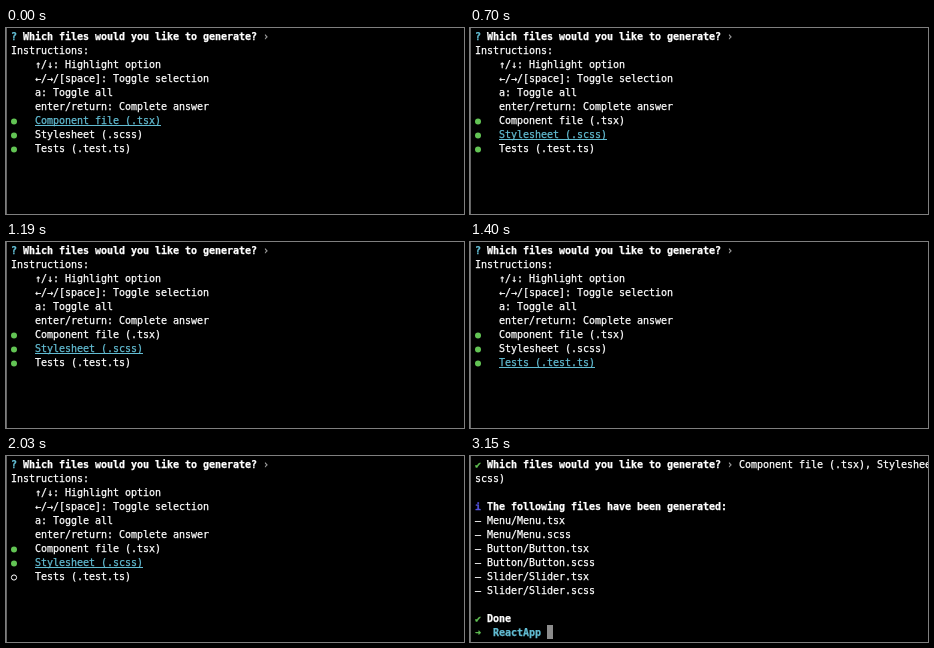
An HTML page that plays this animation: 458x186 px, repeating every 4200 ms.

```html
<!DOCTYPE html>
<html lang="en">
<head>
<meta charset="utf-8">
<title>File generator prompt</title>
<style>
html, body { margin: 0; width: 100%; height: 100%; overflow: hidden; background: #000; }
svg { display: block; width: 458px; height: 186px; }
text {
  font: 10px "DejaVu Sans Mono", "Noto Sans Mono", monospace;
  letter-spacing: -0.02px;
  white-space: pre;
  fill: currentColor;
  stroke: currentColor;
  stroke-width: 0.25px;
}
.bold { font-weight: bold; }
</style>
</head>
<body>
<svg id="stage" viewBox="0 0 458 186"></svg>
<script>
const LOOP = 4200;
const LEFT = 5, COL = 6, ROW = 14, BASE = 12;
const WHITE = '#fff', CYAN = '#62bcd2', GREEN = '#62c454', BLUE = '#5654e0', GREY = '#8c8c8c';
const stage = document.getElementById('stage');

function add(parent, tag, attrs, content) {
  const el = document.createElementNS('http://www.w3.org/2000/svg', tag);
  for (const key in attrs) el.setAttribute(key, attrs[key]);
  if (content) el.textContent = content;
  parent.appendChild(el);
  return el;
}

const colX = col => LEFT + col * COL;
const rowY = row => BASE + row * ROW;

function print(parent, row, col, content, color = WHITE, bold = false) {
  return add(parent, 'text', { x: colX(col), y: rowY(row), color, class: bold ? 'bold' : '' }, content);
}

add(stage, 'rect', { width: 458, height: 186, fill: '#000' });
add(stage, 'rect', { width: 1, height: 186, fill: '#666' });
print(stage, 0, 2, 'Which files would you like to generate?', WHITE, true);
print(stage, 0, 42, '›', '#a8a8a8');

// Selection menu
const menu = add(stage, 'g', {});
print(menu, 0, 0, '?', CYAN, true);
print(menu, 1, 0, 'Instructions:');
['↑/↓: Highlight option', '←/→/[space]: Toggle selection', 'a: Toggle all', 'enter/return: Complete answer']
  .forEach((line, i) => print(menu, 2 + i, 4, line));

const options = ['Component file (.tsx)', 'Stylesheet (.scss)', 'Tests (.test.ts)'].map((name, i) => {
  const row = 6 + i;
  return {
    dot: add(menu, 'circle', { cx: 8, cy: rowY(row) - 2.5 }),
    label: print(menu, row, 4, name),
    line: add(menu, 'rect', { x: colX(4), y: rowY(row) + 1, width: name.length * COL, height: 1, fill: CYAN })
  };
});

// Generated files
const result = add(stage, 'g', {});
print(result, 0, 0, '✔', GREEN);
print(result, 0, 44, 'Component file (.tsx), Stylesheet (.');
print(result, 1, 0, 'scss)');
print(result, 3, 0, 'ℹ', BLUE, true);
print(result, 3, 2, 'The following files have been generated:', WHITE, true);
['Menu', 'Button', 'Slider'].forEach((name, i) => {
  ['tsx', 'scss'].forEach((ext, j) => print(result, 4 + 2 * i + j, 0, `– ${name}/${name}.${ext}`));
});
print(result, 11, 0, '✔', GREEN);
print(result, 11, 2, 'Done', WHITE, true);

const prompt = add(result, 'g', {});
print(prompt, 12, 0, '➜', GREEN, true);
print(prompt, 12, 3, 'ReactApp', CYAN, true);
const cursor = add(result, 'rect', { y: 169, width: 6, height: 14, fill: GREY });

// [time, highlighted option]
const moves = [[0, 0], [700, 1], [910, 2], [1190, 1], [1400, 2], [2030, 1]];
const show = (el, on) => el.setAttribute('visibility', on ? 'inherit' : 'hidden');

function draw(t) {
  const done = t >= 3080, ready = t >= 3150;
  show(menu, !done);
  show(result, done);
  show(prompt, ready);
  cursor.setAttribute('x', colX(ready ? 12 : 0));

  const active = moves.filter(m => m[0] <= t).pop()[1];
  options.forEach(({ dot, label, line }, i) => {
    const on = i < 2 || t < 1680;
    label.setAttribute('color', i === active ? CYAN : WHITE);
    show(line, i === active);
    dot.setAttribute('r', on ? 3 : 2.6);
    dot.setAttribute('fill', on ? GREEN : 'none');
    dot.setAttribute('stroke', on ? 'none' : WHITE);
  });
}

const start = performance.now();
function tick() {
  draw((performance.now() - start) % LOOP);
  requestAnimationFrame(tick);
}
tick();
</script>
</body>
</html>
```
